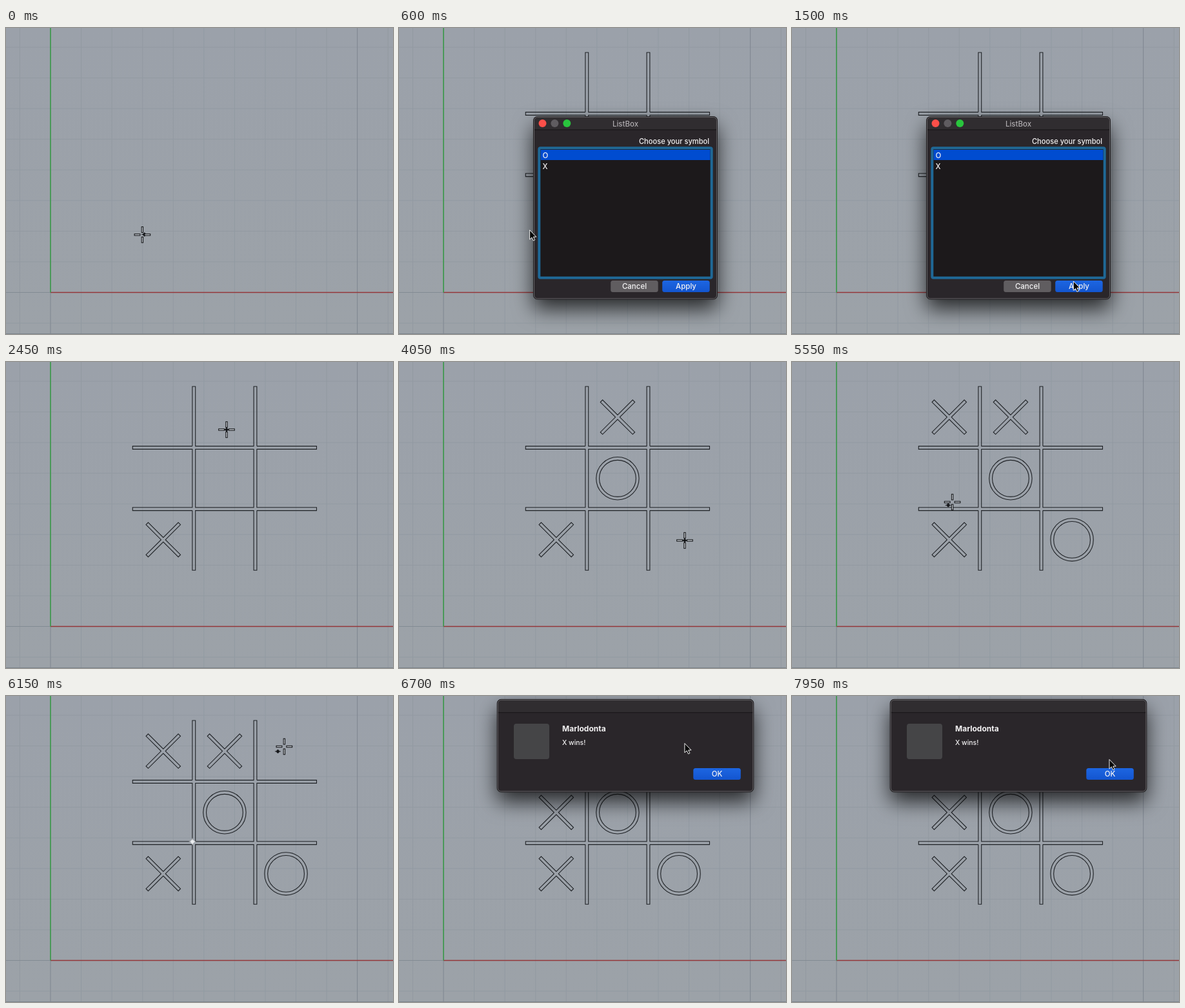
An HTML page that plays this animation: 600 by 475 pixels, repeating every 8 s.

```html
<!DOCTYPE html>
<html lang="en">
<head>
<meta charset="utf-8">
<title>Noughts and crosses</title>
<style>
  html, body { margin: 0; width: 100%; height: 100%; overflow: hidden; background: #9ba1a9; }
  svg { display: block; width: 100%; height: 100%; }
  text { font: 500 11.5px Inter, "Open Sans", sans-serif; fill: #f4f3f4; }
  .ink { fill: none; stroke: #1f2226; stroke-width: 1.1; }
</style>
</head>
<body>
<svg viewBox="0 0 600 475" preserveAspectRatio="none">
  <defs>
    <linearGradient id="sky" x2="0" y2="1">
      <stop offset="0" stop-color="#9ba1aa"/>
      <stop offset="1" stop-color="#9ca2a8"/>
    </linearGradient>
    <linearGradient id="blue" x2="0" y2="1">
      <stop offset="0" stop-color="#1d66e2"/>
      <stop offset="1" stop-color="#1355cf"/>
    </linearGradient>
    <filter id="shade" filterUnits="userSpaceOnUse" x="0" y="-80" width="640" height="620">
      <feDropShadow dx="0" dy="15" stdDeviation="16" flood-color="#000" flood-opacity=".75"/>
    </filter>
    <path id="cross" d="M-2.4-35.4H2.4V-2.4H35.4V2.4H2.4V35.4H-2.4V2.4H-35.4V-2.4H-2.4Z" transform="rotate(45)"/>
    <g id="ring"><circle r="33.2"/><circle r="28.4"/></g>
    <path id="side" d="M-50-50V-142.6H-45.2V-50H45.2V-142.6H50V-50"/>
  </defs>

  <rect width="600" height="475" fill="url(#sky)"/>
  <g id="grid"></g>
  <g class="ink" id="board" transform="translate(338.9 180.6)">
    <rect x="-45.2" y="-45.2" width="90.4" height="90.4"/>
  </g>
  <g class="ink" id="marks"></g>

  <g id="snap" transform="translate(289 226)" fill="#eceef0">
    <path d="M0-6L1.6-1.6L6 0L1.6 1.6L0 6L-1.6 1.6L-6 0L-1.6-1.6Z" opacity=".7"/>
    <circle r="2.6"/>
  </g>

  <g id="chooser"></g>
  <g id="alert"></g>

  <path id="lag" d="M-4.5 0H-3L0-3L3 0H4.5H3L0 3L-3 0Z" fill="#15171a" stroke="#15171a" stroke-width=".6"/>
  <g id="aim" fill="#c3c8ce" stroke="#0c0d0f"></g>
  <path id="arrow" d="M0 0V14.4L3.3 11.4L5.6 16.4L8 15.3L5.8 10.5H10.2Z" fill="#050505" stroke="#f2f2f2" stroke-linejoin="round"/>
</svg>
<script>
const LOOP = 8000, STEP = 50, PITCH = 47.57, CELL = 2 * PITCH;
const $ = id => document.getElementById(id);
const clamp = v => Math.max(0, Math.min(1, v));
const smooth = u => u * u * (3 - 2 * u);

function add(parent, tag, attrs, text = '') {
  const el = document.createElementNS('http://www.w3.org/2000/svg', tag);
  for (const k in attrs) el.setAttribute(k, attrs[k]);
  el.textContent = text;
  return parent.appendChild(el);
}
const box = (parent, x, y, width, height, rx, fill, more) =>
  add(parent, 'rect', { x, y, width, height, rx, fill, ...more });
const label = (parent, x, y, text, anchor = 'start', style = '') =>
  add(parent, 'text', { x, y, 'text-anchor': anchor, style }, text);
const line = (d, stroke, width = 1) => add($('grid'), 'path', { d, stroke, 'stroke-width': width });

function panel(parent, x, y, w, h) {
  box(parent, x, y, w, h, 6, '#2b282b', { filter: 'url(#shade)' });
  box(parent, x, y, w, 20.5, 6, '#302d30');
  add(parent, 'path', { d: `M${x} ${y + 20.5}h${w}`, stroke: '#151315' });
  box(parent, x, y, w, h, 6, 'none', { stroke: '#1b191b' });
  box(parent, x + 1, y + 1, w - 2, h - 2, 5, 'none', { stroke: '#656366' });
}
function button(parent, x, y, text, fill) {
  box(parent, x, y, 73.5, 18, 3.5, fill);
  label(parent, x + 36.8, y + 13.2, text, 'middle');
}

// ground plane
for (let i = -1; i < 12; i++) {
  const x = 69 + i * PITCH, y = 410.5 - i * PITCH;
  line(`M${x} 0V475`, i === 10 ? '#7e868f' : '#929aa2');
  line(`M0 ${y}H600`, i ? '#929aa2' : '#828a93');
}
line('M69 410V475', '#828a93');
line('M0 474.5H600', '#7d858d');
line('M69 410.5H600', '#943639', 1.4);
line('M69 0V410.5', '#389846', 1.6);

for (const turn of [0, 90, 180, 270]) {
  const transform = `rotate(${turn})`;
  add($('aim'), 'rect', { x: -1.2, y: -12.3, width: 2.4, height: 8.8, transform });
  add($('board'), 'use', { href: '#side', transform });
}

// symbol picker
const chooser = $('chooser');
panel(chooser, 208.5, 137.5, 285, 283.5);
['#fb4f49', '#5f5c60', '#29c53d'].forEach((fill, i) =>
  add(chooser, 'circle', { cx: 222.5 + i * 18.9, cy: 148, r: 6, fill }));
label(chooser, 351, 152.5, 'ListBox', 'middle', 'fill:#aeabae');
label(chooser, 481, 180, 'Choose your symbol', 'end', 'font-size:11.1px');
box(chooser, 217.3, 186.3, 267.4, 201.4, 2, '#1c191b', { stroke: '#1f6896', 'stroke-width': 4 });
box(chooser, 219.5, 189, 263, 16, 0, '#004cd0');
label(chooser, 222.5, 201.5, 'O');
label(chooser, 222.5, 218.5, 'X');
button(chooser, 328.2, 392, 'Cancel', '#605d60');
button(chooser, 408.2, 392, 'Apply', 'url(#blue)');

// result message
const alert = $('alert');
panel(alert, 152.2, 5.3, 397.6, 143.7);
box(alert, 178, 43, 55, 55, 4, '#454547');
label(alert, 253, 54.5, 'Marlodonta', 'start', 'font-weight:700;font-size:12px');
label(alert, 253, 75.5, 'X wins!', 'start', 'font-size:10.4px');
button(alert, 456.3, 112, 'OK', 'url(#blue)');

// each round: reply time, reply cell, and the ring placed just before it
const rounds = [
  { at: 1950, cross: [0, 2] },
  { at: 3150, cross: [1, 0], ring: [1, 1] },
  { at: 4550, cross: [0, 0], ring: [2, 2] },
  { at: 6450, cross: [0, 1], ring: [2, 0] }
];
const marks = [];
function mark(shape, cell, at) {
  if (!cell) return;
  const [x, y] = cell.map((n, i) => [243.8, 85.6][i] + n * CELL);
  marks.push({ at, el: add($('marks'), 'use', { href: '#' + shape, transform: `translate(${x} ${y})` }) });
}
for (const { at, cross, ring } of rounds) {
  mark('ring', ring, at - STEP);
  mark('cross', cross, at);
}

// pointer strokes: start, end, goal
const strokes = [
  [-150, 250, 197, 323], [500, 1100, 272, 198], [1100, 1450, 436.3, 393],
  [1750, 2400, 342, 105], [2600, 3050, 372, 152], [3150, 3950, 443, 277],
  [4550, 5250, 240, 224], [5450, 6250, 440, 72], [6500, 7900, 492, 98.5]
];
function pointer(t) {
  let x = 218, y = 320;
  for (const [from, to, gx, gy] of strokes) {
    const u = smooth(clamp((t - from) / (to - from)));
    x += (gx - x) * u;
    y += (gy - y) * u;
  }
  return [x, y];
}

function show(el, alpha) {
  el.style.display = alpha > 0 ? '' : 'none';
  el.style.opacity = +alpha;
}
const moveTo = (el, [x, y]) => el.setAttribute('transform', `translate(${x.toFixed(1)} ${y.toFixed(1)})`);

function draw(t) {
  const useArrow = t >= 550 && t < 1800 || t >= 6500;
  show($('board'), t >= 350);
  for (const m of marks) show(m.el, t >= m.at);
  show($('snap'), t >= 5800 && t < 6400);
  show(chooser, clamp(Math.min(t - 500, 1850 - t) / 100));
  show(alert, clamp((t - 6450) / 100));

  moveTo($('aim'), pointer(t));
  moveTo($('arrow'), pointer(t));
  moveTo($('lag'), pointer(t - STEP));
  show($('aim'), !useArrow);
  show($('lag'), !useArrow);
  show($('arrow'), useArrow);
}

function tick() {
  draw(Math.floor(performance.now() % LOOP / STEP) * STEP);
  requestAnimationFrame(tick);
}
tick();
</script>
</body>
</html>
```
